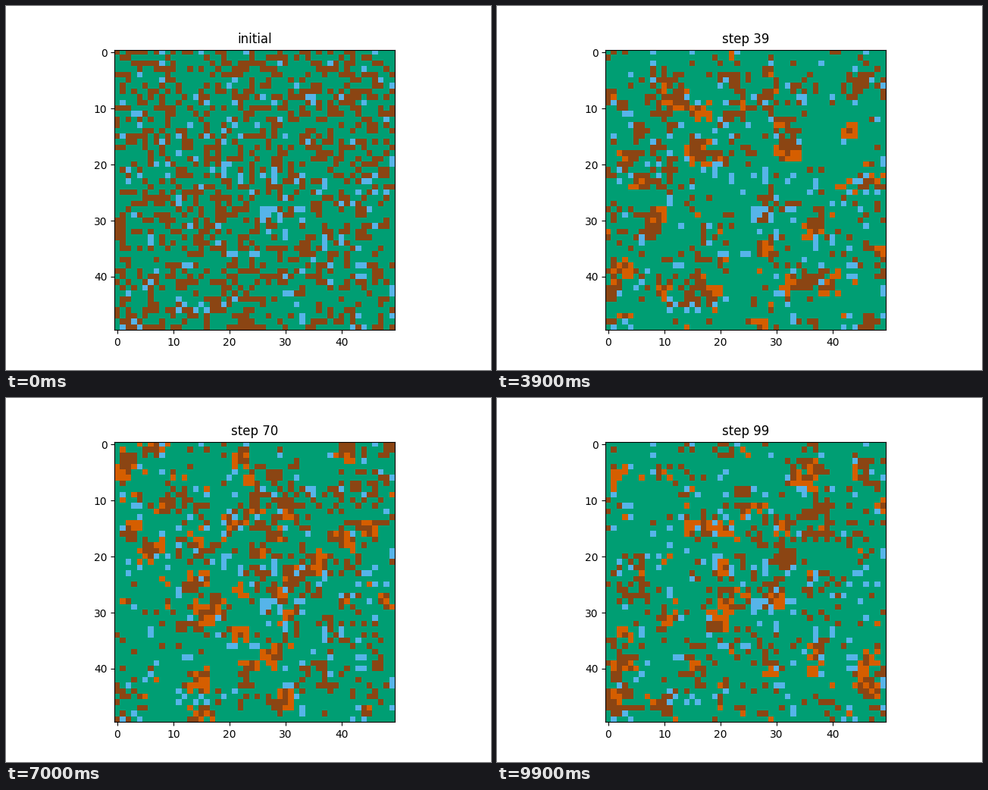
A matplotlib script for the animation above (10 s loop, 640 px wide and 480 px high).

```python
import matplotlib.pyplot as plt
import numpy as np
from matplotlib.animation import FuncAnimation
from matplotlib.colors import ListedColormap

SIZE, STEPS = 50, 100
DIRT, TREE, WATER, FIRE = range(4)
COLORS = ["#8B4513", "#009E73", "#56B4E9", "#D55E00"]
GROW, SPARK, FLARE, CATCH = 0.26, 0.014, 0.32, 0.65

rng = np.random.default_rng(12)


def chance(p):
    return rng.random((SIZE, SIZE)) < p


def around(mask):
    """Cells whose 3x3 neighbourhood touches the mask."""
    pad = np.pad(mask, 1)
    return np.any([pad[r:r + SIZE, c:c + SIZE]
                   for r in range(3) for c in range(3)], axis=0)


def plant():
    grid = np.where(chance(0.36), DIRT, TREE)
    grid[chance(0.05)] = WATER
    for row, col in ((21, 28), (20, 19), (28, 26), (33, 37)):
        grid[row:row + 3, col] = WATER
    return grid


def advance(grid):
    """Burn out, regrow, strike, and let some fires flare into neighbours."""
    tree, fire = grid == TREE, grid == FIRE
    flare = fire & chance(FLARE)
    caught = around(flare) & chance(CATCH)
    new = grid.copy()
    new[fire] = DIRT
    new[(grid == DIRT) & chance(GROW)] = TREE
    new[tree & (caught | chance(SPARK))] = FIRE
    new[flare & caught] = FIRE
    return new


forest = [plant()]
for _ in range(STEPS - 1):
    forest.append(advance(forest[-1]))

fig, ax = plt.subplots(figsize=(6.4, 4.8), dpi=100)
image = ax.imshow(forest[0], cmap=ListedColormap(COLORS), vmin=-0.5, vmax=3.5,
                  interpolation="nearest")
title = ax.set_title("initial")


def update(step):
    image.set_data(forest[step])
    title.set_text(f"step {step}" if step else "initial")
    return image, title


anim = FuncAnimation(fig, update, frames=STEPS, interval=100, repeat=True,
                     repeat_delay=0, blit=False)
plt.show()
```
